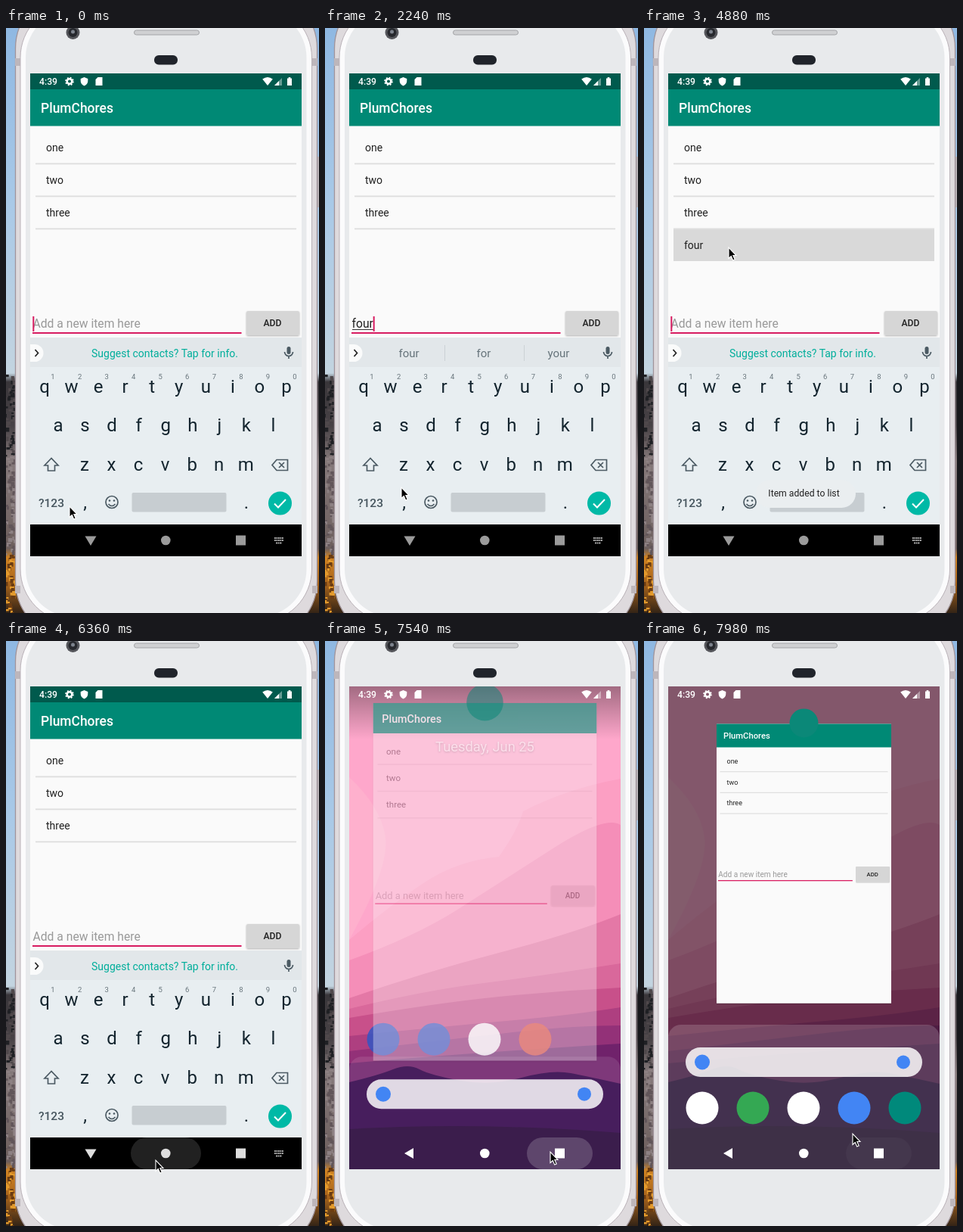
These frames come from a looping animation (414x773 px, 8000 ms). An HTML page:

```html
<!DOCTYPE html>
<html lang="en">
<head>
<meta charset="utf-8">
<title>To-do list demo</title>
<style>
html, body { margin: 0; width: 100%; height: 100%; overflow: hidden; }
svg { display: block; width: 100vw; height: 100vh; font-family: Roboto, sans-serif; }
.mid { text-anchor: middle; }
.med { font-weight: 500; }
.line { fill: none; stroke: #4b5a63; stroke-width: 1.7; }
.item { font-size: 14px; fill: #212121; }
.key { font-size: 24px; fill: #13242e; text-anchor: middle; }
.num { font-size: 9.5px; fill: #68757c; text-anchor: middle; }
.word { font-size: 15px; fill: #66747b; text-anchor: middle; }
</style>
</head>
<body>
<svg viewBox="0 0 414 773">
  <defs>
    <linearGradient id="sky" x2="0" y2="1">
      <stop offset="0" stop-color="#8fb8e2"/><stop offset=".3" stop-color="#a9c9e7"/>
      <stop offset=".59" stop-color="#c3d4e0"/><stop offset=".605" stop-color="#39363a"/>
      <stop offset=".68" stop-color="#484246"/><stop offset=".74" stop-color="#85797a"/>
      <stop offset=".89" stop-color="#6d5f5d"/><stop offset=".905" stop-color="#d08322"/>
      <stop offset=".95" stop-color="#a8641c"/><stop offset="1" stop-color="#342416"/>
    </linearGradient>
    <linearGradient id="dusk" x2="0" y2="1">
      <stop offset="0" stop-opacity=".5"/><stop offset="1" stop-opacity="0"/>
    </linearGradient>
    <clipPath id="screen"><path d="M32 60H391V698H32z"/></clipPath>
    <filter id="soft" x="-20%" y="-20%" width="140%" height="150%">
      <feDropShadow dx="0" dy="1" stdDeviation="1" flood-opacity=".3"/>
    </filter>
  </defs>

  <!-- desktop and phone body -->
  <path fill="url(#sky)" d="M0 0H414V773H0z"/>
  <g id="brush"></g>
  <rect x="410" y="170" width="4" height="67" fill="#b9b3b7"/>
  <rect x="12.5" y="-48" width="399" height="854" rx="75" fill="#dedadd" stroke="#a0949b" stroke-width="1.300"/>
  <path d="M12 40h7v10h-7zM405 40h7v10h-7zM12 737h7v10h-7zM405 737h7v10h-7z" fill="#bdb6bb"/>
  <rect x="19" y="-31" width="385.500" height="816" rx="70" fill="#fbfbfc" stroke="#b9b1b7"/>
  <rect x="26" y="-24" width="371.500" height="802" rx="63" fill="#e8eaec"/>
  <circle cx="88.500" cy="6" r="9" fill="#55565b"/><circle cx="88.500" cy="6" r="6" fill="#26282d"/>
  <circle cx="88.500" cy="5" r="2.500" fill="#7d838d"/>
  <rect x="169.500" y="3" width="86" height="6" rx="3" fill="#cfd0d2" stroke="#a3a4a7"/>
  <rect x="196" y="36" width="31" height="12.500" rx="6" fill="#20242b"/>

  <g clip-path="url(#screen)">
    <g id="home">
      <g id="wall"></g>
      <path id="scrim" d="M32 60H391V698H32z" fill="#08080c"/>
      <path id="shade" d="M32 60H391V130H32z" fill="url(#dusk)"/>
      <rect id="panel" x="32" y="578" width="359" height="260" rx="17" fill="#fff"/>
      <text id="date" class="mid" y="135.300" font-size="20.960" fill="#fff"
        style="text-shadow:0 1px 3px #0009">Tuesday, Jun 25</text>
      <g id="dock"></g>
      <g id="search">
        <rect id="pill" x="55" y="608" width="313" height="39" rx="19.500" fill="#fff"/>
        <circle cx="77" cy="627.500" r="10" fill="#4285f4"/><circle cx="343" cy="627.500" r="9" fill="#4285f4"/>
      </g>
      <g id="row"></g>
      <rect id="press" x="267" y="656" width="87" height="42" rx="21" fill="#fff"/>
      <g fill="#fff"><path d="M105 677l12-7v14z"/><circle cx="211.300" cy="677" r="6.300"/><path d="M304 670.500h13v13h-13z"/></g>
    </g>

    <path id="statusBg" fill="#005a4d" d="M32 60H391V81H32z"/>
    <g id="app">
      <g id="page">
        <path fill="#fafafa" d="M32 81H391V655H32z" filter="url(#soft)"/>
        <rect id="hit" x="39" y="265" width="345" height="43" fill="#d9d9d9"/>
        <g id="list"></g>
        <text id="hint" x="35.500" y="396" font-size="15.700" fill="#999">Add a new item here</text>
        <text id="typed" x="35.500" y="396" font-size="15.700" fill="#212121"></text>
        <rect id="under" x="36" y="398" height="1" fill="#333"/>
        <rect x="35" y="402" width="276.500" height="2" fill="#d81b60"/>
        <rect id="caret" y="381" width="2" height="20" fill="#d81b60"/>
        <rect id="add" x="318" y="374" width="70" height="32" rx="2" filter="url(#soft)"/>
        <text class="mid med" x="352.500" y="394" font-size="12.200" fill="#222">ADD</text>
      </g>
      <g id="bar">
        <path fill="#008975" d="M32 81H391V129.500H32z"/>
        <text class="med" x="46" y="112" font-size="17.470" fill="#fff">PlumChores</text>
      </g>
    </g>
    <circle id="badge" cx="211.500" fill="#0b8878"/>

    <g id="ime">
      <path fill="#e8eef1" d="M32 409H391V656H32z"/>
      <path fill="#e2e7ea" d="M32 409H391V448H32z"/>
      <path fill="#fafbfb" d="M32 418h6a11.500 11.500 0 0 1 0 23h-6z"/>
      <path class="line" d="M38.500 425l4 4.500-4 4.500" style="stroke:#222"/>
      <text id="tip" class="mid" x="210" y="434.500" font-size="14" fill="#00ae9b">Suggest contacts? Tap for info.</text>
      <g id="words"><path d="M158.500 419v21M263.500 419v21" stroke="#cbd1d5"/>
        <text class="word" x="111" y="435"></text><text class="word" x="210" y="435"></text><text class="word" x="309" y="435"></text></g>
      <rect x="371.500" y="421" width="5" height="10" rx="2.500" fill="#4b5a63"/>
      <path class="line" d="M368.500 428a5.500 5.500 0 0 0 11 0M374 433.500v3.500"/>
      <g id="keys"></g>
      <path class="line" d="M60 568.500l-9 9.500h4.500v7h9v-7h4.500z"/>
      <path class="line" d="M358 570.500h14.500v14H358l-6-7zM361 574l7 7M368 574l-7 7"/>
      <text class="mid med" x="60" y="633" font-size="15.500" fill="#46555e">?123</text>
      <text class="key" x="104.500" y="635">,</text><text class="key" x="318" y="635">.</text>
      <circle class="line" cx="140" cy="626.500" r="8"/>
      <path class="line" d="M135.500 629q4.500 5 9 0"/><circle cx="137" cy="624.500" r="1.300" fill="#4b5a63"/><circle cx="143" cy="624.500" r="1.300" fill="#4b5a63"/>
      <rect x="166.500" y="614" width="125" height="25.500" rx="2" fill="#c7cdd1"/>
      <circle cx="362.500" cy="628" r="15.500" fill="#00b9a6"/>
      <path d="M355 628.500l5 5 10-10.500" fill="none" stroke="#fff" stroke-width="2"/>
      <g id="toast"><rect x="148" y="597" width="132" height="37" rx="18.500" fill="#eaeef0"/>
        <text class="mid" x="211.500" y="619" font-size="12.200" fill="#222">Item added to list</text></g>
      <path d="M32 656H391V698H32z"/>
      <rect id="homePress" x="165" y="656" width="93" height="42" rx="21" fill="#212121"/>
      <g id="nav"><path d="M104.500 671.500h15l-7.500 12.500z"/><circle cx="211.300" cy="677" r="6.300"/><path d="M304 670.500h13v13h-13z"/>
        <path d="M355 674h12M355 677h12M357 680.500h8" fill="none" stroke="#b5b5b5" stroke-width="1.800" stroke-dasharray="1.800 .7"/></g>
    </g>

    <g fill="#fff">
      <text class="med" x="44" y="75" font-size="12.200">4:39</text>
      <circle cx="84" cy="70.500" r="3.300" fill="none" stroke="#fff" stroke-width="2.600"/>
      <circle cx="84" cy="70.500" r="5" fill="none" stroke="#fff" stroke-width="1.600" stroke-dasharray="2 1.927"/>
      <path d="M103.500 65l4.800 2v3q0 4-4.800 6.500-4.800-2.500-4.800-6.500v-3z"/>
      <path d="M121.500 65h6v11h-9v-8z"/>
      <path d="M346 76l-6.800-8.500q6.800-5 13.600 0z"/>
      <path d="M355 76h10v-10z" opacity=".4"/><path d="M355 76h6v-6z"/>
      <path d="M372 66.500h1.700v-1.500h2.600v1.500h1.700v9.500h-6z"/>
    </g>
  </g>
  <path id="mouse" d="M0 0V14.500L3.300 11.500 5.700 17 8.200 16 5.800 10.500H10z" stroke="#fff" stroke-width="1.100"/>
</svg>

<script>
const $ = id => document.getElementById(id);
const fade = (id, v) => $(id).setAttribute('opacity', v);
const set = (id, attrs) => { for (const k in attrs) $(id).setAttribute(k, attrs[k]); };
const clamp = v => Math.max(0, Math.min(1, v));
const STEP = 147.5;

// Seeded specks of foliage beside the phone
let seed = 7;
const rand = () => (seed = seed * 16807 % 2147483647) / 2147483647;
let specks = '';
for (let y = 458; y < 773; y += 2) {
  const tones = y < 565 ? ['#1f2024', '#4f484b'] : y < 695 ? ['#8d8183', '#62565a'] : ['#e39a2c', '#6b3c12'];
  specks += `<rect x="${rand() * 12 - 2}" y="${y}" width="${2 + rand() * 4}" height="${2 + rand() * 4}" fill="${tones[rand() < 0.5 ? 0 : 1]}"/>`;
}
$('brush').innerHTML = specks;

// Wallpaper: each layer runs from its ridge down to the bottom
const ridges = [
  ['#ffa8cc', 'M32 60H391'],
  ['#fda0c4', 'M32 395Q85 350 130 320T230 285Q255 250 262 225Q320 195 391 182'],
  ['#f68fb9', 'M32 422Q120 390 175 355T300 275T391 243'],
  ['#e578a7', 'M32 472Q130 438 230 412T391 361'],
  ['#da689c', 'M32 486Q130 462 210 452T391 426'],
  ['#c9508b', 'M32 498Q150 478 230 470T391 458'],
  ['#af3f80', 'M32 522Q150 510 240 502T391 484'],
  ['#943178', 'M32 542Q150 528 240 518T391 508'],
  ['#70226b', 'M32 558Q180 545 391 532'],
  ['#33064b', 'M32 583Q70 574 90 566T125 566T180 581T260 577T325 571T391 585'],
  ['#260439', 'M32 645Q200 635 391 650']
];
$('wall').innerHTML = ridges.map(([c, d]) => `<path fill="${c}" d="${d}V698H32z"/>`).join('') +
  '<path fill="#ffb1ce" d="M32 180Q75 220 80 260T32 395z"/>';

const discs = (y, colors) => colors.map((c, i) =>
  `<circle cx="${77 + 67 * i}" cy="${y}" r="21.500" fill="${c}"/>`).join('');
$('dock').innerHTML = discs(555, ['#3056c6', '#3056c6', '#fff', '#e0503f']);
$('row').innerHTML = discs(617, ['#fff', '#34a853', '#fff', '#4285f4', '#00897b']);

$('list').innerHTML = ['one', 'two', 'three', 'four'].map((s, i) =>
  `<g><text class="item" x="53" y="${163 + 43 * i}">${s}</text>` +
  (i < 3 ? `<rect x="39" y="${178.5 + 43 * i}" width="345" height="1.800" fill="#dedede"/>` : '') + '</g>').join('');
const fourth = $('list').lastChild;

const keyRow = (s, x, y) => [...s].map((c, i) =>
  `<text class="key" x="${x + 35.55 * i}" y="${y}">${c}</text>`).join('');
$('keys').innerHTML = keyRow('qwertyuiop', 51, 482) + keyRow('asdfghjkl', 69, 533) + keyRow('zxcvbnm', 104, 585) +
  [...'1234567890'].map((c, i) => `<text class="num" x="${62 + 35.55 * i}" y="464">${c}</text>`).join('');

const guesses = [['f', 'for', 'from'], ['fo', 'for', 'of'], ['four', 'found', 'you'], ['four', 'for', 'your']];
const wordEls = $('words').querySelectorAll('text');

// Pointer stops: step, x, y
const stops = [[14, 84, 632], [15, 101, 607], [19, 343, 386], [22, 343, 386], [26, 112, 290], [37, 112, 290],
  [42, 198, 686], [48, 198, 686], [50, 298, 675], [52, 298, 675], [54, 276, 651]];
function pointer(n) {
  let i = 0;
  while (i < stops.length - 2 && n > stops[i + 1][0]) i++;
  const [a, x, y] = stops[i], [b, x2, y2] = stops[i + 1];
  const u = clamp((n - a) / (b - a)), e = u * u * (3 - 2 * u);
  return [x + (x2 - x) * e, y + (y2 - y) * e];
}

function draw(t) {
  const n = Math.max(0, Math.floor((t - 5) / STEP));
  const inApp = n < 45;
  const leaving = n === 44 ? 0.45 : 1;
  set('mouse', { transform: `translate(${pointer(n)})` });

  // typing and list
  const count = n < 20 ? Math.max(0, Math.min(4, n - 9)) : 0;
  $('typed').textContent = 'four'.slice(0, count);
  const width = count ? $('typed').getComputedTextLength() : 0;
  set('under', { width });
  set('caret', { x: 35.3 + width });
  const dark = n >= 43 || [3, 17, 23, 30, 37].some(s => n >= s && n < s + 3);
  fade('caret', dark ? 0 : 1);
  fade('hint', count ? 0 : 1);
  fade('tip', count ? 0 : 1);
  fade('words', count ? 1 : 0);
  if (count) wordEls.forEach((el, i) => el.textContent = guesses[count - 1][i]);
  set('add', { fill: n === 19 || n === 20 ? '#c3c4c4' : '#d6d6d6' });
  fourth.setAttribute('opacity', n >= 20 && n < 35 ? 1 : 0);
  fade('hit', n < 35 ? clamp((n - 29) / 3) : 0);
  fade('toast', clamp((n - 19) / 3) * clamp((37 - n) / 3));

  // keyboard, navigation bar, leaving the app
  fade('ime', inApp ? leaving : 0);
  fade('statusBg', inApp ? leaving : 0);
  fade('homePress', n >= 43 ? 1 : 0);
  set('nav', { fill: n >= 42 ? '#dedede' : '#9b9b9b' });

  // home screen and overview
  const p = Math.sin(Math.PI / 2 * clamp((n - 49) / 5)) ** 1.7;
  const lift = `translate(0 ${-71 * p})`;
  fade('home', n < 44 ? 0 : 1);
  fade('scrim', 0.5 * p ** 5);
  fade('shade', 3 * p * (1 - p));
  fade('panel', 0.17 * clamp(p / 0.7));
  for (const id of ['panel', 'dock', 'search']) set(id, { transform: lift });
  fade('dock', 1 - p * p);
  fade('pill', n < 46 ? 0.75 : 0.83);
  fade('row', clamp((p - 0.75) * 4));
  set('date', {
    transform: `translate(211.5 ${68 * p}) scale(${1 - 0.31 * p})`,
    opacity: clamp(1 - p * 1.25)
  });
  fade('press', n < 50 ? 0 : [0.12, 0.18, 0.18, 0.1, 0.03][n - 50]);

  // the app page, either full size or as an overview card
  const s = inApp ? 1 : 0.6435 + 0.3565 * (1 - p) ** 1.32;
  const top = inApp ? 81 : 81 + 28.4 * p ** 3.6;
  set('app', { transform: `translate(${211.5 * (1 - s)} ${top - 81 * s}) scale(${s})` });
  fade('page', inApp ? leaving : p ** 1.2);
  fade('bar', inApp ? leaving : clamp(p * 1.45));
  set('badge', { cy: top - 1, r: 29.5 * s, opacity: inApp ? 0 : clamp(p * 1.3) });
}

function frame(now) {
  draw(now % 8000);
  requestAnimationFrame(frame);
}
draw(0);
requestAnimationFrame(frame);
</script>
</body>
</html>
```
